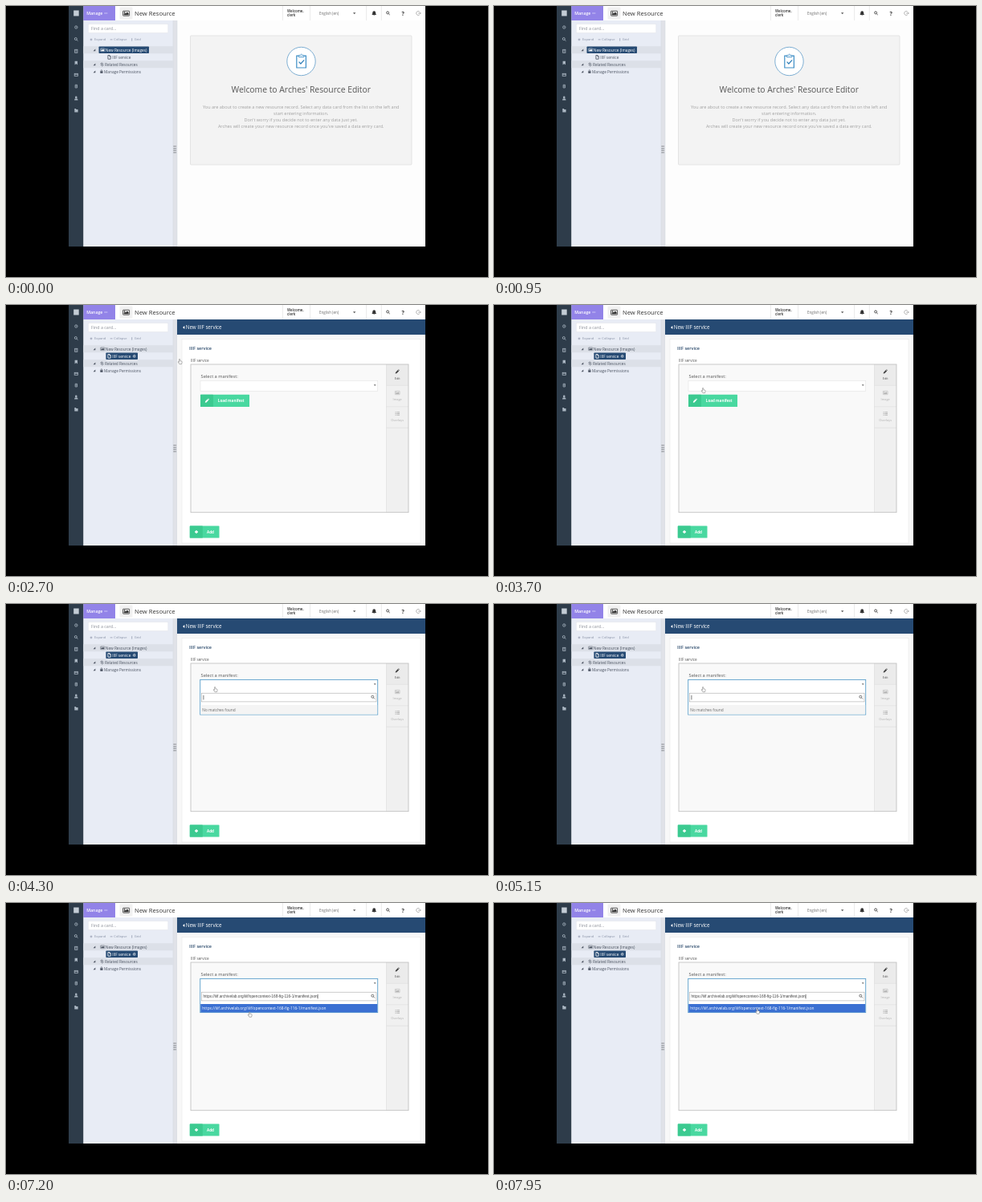
An HTML page for the animation above (8 s loop, 600x338 px).

```html
<!DOCTYPE html>
<html lang="en">
<head>
<meta charset="utf-8">
<title>Resource editor</title>
<style>
html, body { margin: 0; height: 100%; overflow: hidden; background: #000; }
svg { display: block; width: 100vw; height: 100vh; font-family: "Open Sans", sans-serif; }
text { white-space: pre; }
.line { fill: none; stroke: currentColor; stroke-width: .8; }
.solid { fill: currentColor; }
.tree { font-size: 4.78px; fill: #4a5260; }
.tools { font-size: 4.1px; fill: #8790a5; }
.body { font-size: 5.53px; fill: #a0a0a0; text-anchor: middle; }
.tab { font-size: 3.9px; text-anchor: middle; }
.button { font-size: 4.6px; font-weight: 700; fill: #fff; }
</style>
</head>
<body>
<svg viewBox="0 0 600 338">
<defs>
  <g id="search"><circle class="line" cx="-.5" cy="-.5" r="1.5"/><path class="line" d="M.6 .6L2.2 2.2"/></g>
  <g id="image"><rect class="line" x="-4" y="-3" width="8" height="6" rx=".5"/><path class="solid" d="M-3 2V.8L-1.5-.7-.6.2 1.3-1.7 3 0V2z"/><circle class="solid" cx="-2" cy="-1.3" r=".8"/></g>
  <g id="doc"><path class="line" d="M-1.6-2.3H.5L1.7-1V2.4H-1.6zM.4-2.3V-.9H1.7"/></g>
  <g id="pencil"><path class="solid" d="M-2.4 2.4L-2 .7.8-2.1 2.1-.8-.7 2zM1.2-2.5L1.7-2.9 2.9-1.7 2.5-1.2z"/></g>
  <g id="plus"><path class="line" d="M-2 0H2M0-2V2" style="stroke-width:1.3"/></g>
  <g id="expander"><path d="M1.3-1.4V1.3H-1.4z" fill="#4a5260"/></g>
  <g id="add"><circle r="2.1" class="solid"/><path d="M-1.1 0H1.1M0-1.1V1.1" stroke-width=".7"/></g>
</defs>

<!-- application frame -->
<rect x="78" width="444" height="300" fill="#fdfdfd"/>
<rect x="78" width="18.5" height="300" fill="#2e3c4a"/>
<rect x="84.2" y="5.5" width="6.5" height="7" fill="#c3ccd5"/>
<g color="#aab6c2">
  <g transform="translate(87.3 26.5)"><circle class="line" r="1.7"/><path class="line" d="M0 0V-1M0 0H.9" style="stroke-width:.5"/></g>
  <use href="#search" x="87.3" y="41.5"/>
  <g transform="translate(87.3 56.3)"><rect class="line" x="-1.6" y="-2" width="3.2" height="4"/><path class="line" d="M-1-.7H1M-1 .6H1" style="stroke-width:.5"/></g>
  <path class="solid" d="M85.6 68.8H89V73.4L87.3 71.9 85.6 73.4z"/>
  <g transform="translate(87.3 85.8)"><rect class="line" x="-2.1" y="-1.5" width="4.2" height="3"/><path class="line" d="M-1.8-.5H1.8"/></g>
  <path class="line" d="M86.2 98.3H88.5V102H86.2zM86.2 100H88"/>
  <circle class="solid" cx="87.3" cy="113.9" r="1.3"/><path class="solid" d="M85 117.6Q85 115.3 87.3 115.3T89.6 117.6z"/>
  <path class="solid" d="M85.3 128H87.2V129H89.6V132.4H85.3z"/>
</g>

<rect x="96.5" width="39.5" height="18" fill="#9283e8"/>
<text x="100.3" y="11" font-size="5.2" font-weight="600" fill="#fff">Manage</text>
<path d="M122.2 9H126.4" stroke="#d8d2fa" stroke-width=".8"/>
<rect x="136" width="386" height="18" fill="#fff"/>
<rect x="141.5" y="1.5" width="16" height="15" rx="1" fill="#f1f1f1"/>
<g color="#333"><use href="#image" x="149.6" y="9.2"/></g>
<text x="160" y="11.7" font-size="7.64" fill="#333">New Resource</text>
<path d="M344.5 0V18M378.5 0V18M448.5 0V18M467.3 0V18" fill="none" stroke="#e2e2e2" stroke-width=".7"/>
<g font-size="4.4" font-weight="600" fill="#333"><text x="350" y="8.2">Welcome,</text><text x="350" y="13">clerk</text></g>
<text x="390" y="10.7" font-size="4.5" fill="#666">English (en)</text>
<path d="M432 8.2H435.4L433.7 10.2z" fill="#555"/>
<g color="#333">
  <path class="solid" d="M455.3 11Q456.3 10.3 456.3 8.3 456.3 6.5 458.2 6.3 460.1 6.5 460.1 8.3 460.1 10.3 461.1 11zM457.4 11.3H459Q458.2 12.5 457.4 11.3z"/>
  <use href="#search" x="475.6" y="8.9"/>
  <text x="492.5" y="11.6" font-size="7" font-weight="700" fill="#333">?</text>
  <path d="M514.8 7.1A2.5 2.5 0 1 0 514.8 10.9M513 9H516.3M515.2 7.8L516.3 9 515.2 10.2" fill="none" stroke="#888" stroke-width=".6"/>
</g>

<!-- tree panel -->
<rect x="96.5" y="18" width="111.5" height="282" fill="#e8ecf5"/>
<rect x="208" y="18" width="5" height="282" fill="#e0e2e8"/>
<path d="M208 18V300M213 18V300" stroke="#d3d6dd" stroke-width=".5"/>
<path d="M209.2 174.3V184M211.1 174.3V184" stroke="#8a8d92" stroke-width="1.3" stroke-dasharray="1.5 1.1"/>
<rect x="102.3" y="22.5" width="99.5" height="11" fill="#fff" stroke="#e1e4ea" stroke-width=".5"/>
<text x="106" y="30" font-size="5.3" fill="#8b8f98">Find a card...</text>
<g class="tools"><text x="110" y="43.4">Expand</text><text x="134.3" y="43.4">Collapse</text><text x="159.7" y="43.4">Grid</text></g>
<path d="M104.6 41.9H107.4M106 40.5V43.3M129.7 41.9H132.6M156.7 40.2V43.6" stroke="#8790a5" stroke-width=".7"/>
<path d="M96.5 54.8H208M96.5 72.8H208" stroke="#dce0e8" stroke-width="9"/>
<use href="#expander" x="110" y="55"/><use href="#expander" x="110" y="73"/><use href="#expander" x="110" y="82"/>
<rect id="rootBox" x="115.5" y="50.5" width="62.5" height="8.6" rx=".8" fill="#264a73"/>
<rect id="leafBox" x="124.4" y="59.4" width="39.6" height="8.7" rx=".8" fill="#264a73"/>
<g class="tree">
  <g id="rootRow"><use href="#image" transform="translate(120.2 54.8) scale(.62)"/><text x="123.8" y="56.5">New Resource (Images)</text></g>
  <g id="leafRow"><use href="#doc" x="128.5" y="63.8"/><text x="132.2" y="65.6">IIIF service</text><use id="leafAdd" href="#add" x="159.8" y="63.9"/></g>
  <path d="M118 74.2L121 71.5M117.7 72.2L119.4 70.8M119.6 75L121.4 73.4" stroke="#4a5260" fill="none"/>
  <text x="123" y="74.5">Related Resources</text>
  <rect x="117.3" y="81.3" width="3.2" height="2.5"/><path d="M118 81.5V80.3Q118.9 79 119.8 80.3V81.5" fill="none" stroke="#4a5260" stroke-width=".6"/>
  <text x="122" y="83.5">Manage Permissions</text>
</g>

<!-- welcome page -->
<g id="welcome">
  <rect x="229.5" y="37" width="275.5" height="161" rx="1" fill="#f3f3f3" stroke="#dcdcdc" stroke-width=".7"/>
  <circle cx="367.5" cy="69" r="17.7" fill="#fff" stroke="#5f9bc8" stroke-width=".8"/>
  <g fill="none" stroke="#3f8fc6" stroke-width="1.2"><path d="M364.3 62.2H361.8V77H373.4V62.2H370.8"/><path d="M364.4 63.8V61.4H366.2Q367.6 58.8 369 61.4H370.8V63.8z" fill="#dcecf7" stroke-width=".8"/><path d="M364.6 69.6L366.9 72 371.2 67.3" stroke="#2f7fb8"/></g>
  <text x="367.3" y="107.7" font-size="10.36" text-anchor="middle" fill="#555">Welcome to Arches' Resource Editor</text>
  <g class="body">
    <text x="367.2" y="128">You are about to create a new resource record. Select any data card from the list on the left and</text>
    <text x="367.2" y="136">start entering information.</text>
    <text x="367.2" y="144">Don't worry if you decide not to enter any data just yet.</text>
    <text x="367.2" y="152">Arches will create your new resource record once you've saved a data entry card.</text>
  </g>
</g>

<!-- card editor -->
<g id="editor">
  <rect x="213" y="18" width="309" height="282" fill="#f8f8f8"/>
  <rect x="213" y="18" width="309" height="19" fill="#264a73"/>
  <path d="M222.3 26V30L220 28z" fill="#fff"/>
  <text x="223.8" y="30.2" font-size="6.24" fill="#fff">New IIIF service</text>
  <rect x="219" y="42.5" width="297" height="254.5" fill="#fff" stroke="#e8e8e8" stroke-width=".6"/>
  <text x="228" y="55.6" font-size="5.5" font-weight="600" fill="#2b4a6b">IIIF service</text>
  <text x="230" y="71.3" font-size="4.65" fill="#555">IIIF service</text>
  <rect x="230" y="74" width="271" height="184.7" fill="#f9f9f9"/>
  <rect x="473.5" y="74" width="27.5" height="184.7" fill="#f0f0f0"/>
  <rect x="473.5" y="74" width="27.5" height="26.3" fill="#ebebeb"/>
  <path d="M473.5 74V258.7M473.5 100.3H501M473.5 126.8H501M473.5 153.2H501" fill="none" stroke="#dadada" stroke-width=".6"/>
  <rect x="230" y="74" width="271" height="184.7" fill="none" stroke="#bcbcbc" stroke-width=".8"/>
  <g color="#444"><use href="#pencil" x="487" y="83.2"/><text class="tab" x="487.2" y="92.6" fill="#555">Edit</text></g>
  <g color="#b5b5b5" fill="#b0b0b0">
    <use href="#image" transform="translate(487.2 109.5) scale(.72)"/><text class="tab" x="487.2" y="118.9">Image</text>
    <path d="M484.5 133.8H485.7M486.4 133.8H490M484.5 135.5H485.7M486.4 135.5H490M484.5 137.2H485.7M486.4 137.2H490" stroke="#b5b5b5" stroke-width="1.1"/><text class="tab" x="487.2" y="145.2">Overlays</text>
  </g>
  <text x="242.6" y="91" font-size="5.65" fill="#555">Select a manifest:</text>
  <rect x="242" y="94.3" width="220.7" height="13" fill="#fff" stroke="#e4e4e4" stroke-width=".6"/>
  <path d="M457.8 99.2H460.6L459.2 101z" fill="#666"/>
  <rect x="242" y="111.8" width="61" height="15.2" rx=".6" fill="#49d8a0"/>
  <rect x="242" y="111.8" width="16" height="15.2" rx=".6" fill="#3bca90"/>
  <g color="#fff"><use href="#pencil" x="250.2" y="119.4"/></g>
  <text class="button" x="263.8" y="121">Load manifest</text>
  <rect x="228.8" y="275.5" width="36.7" height="15" rx=".6" fill="#49d8a0"/>
  <rect x="228.8" y="275.5" width="16" height="15" rx=".6" fill="#3bca90"/>
  <g color="#fff"><use href="#plus" x="237" y="283"/></g>
  <text class="button" x="250" y="284.7">Add</text>

  <g id="dropdown">
    <rect id="menu" x="241.7" y="94.4" width="221" height="43.6" fill="#fff" stroke="#5b9fcb" stroke-width=".9"/>
    <path d="M457.8 99.2H460.6L459.2 101z" fill="#666"/>
    <rect x="243.5" y="111.2" width="217.5" height="10.7" fill="#fff" stroke="#aaa" stroke-width=".6"/>
    <g color="#555"><use href="#search" x="456.8" y="116.2"/></g>
    <text id="query" x="245.6" y="118.3" font-size="4.78" font-family="'Liberation Sans', Arial, sans-serif" fill="#444"></text>
    <path id="caret" d="M0 113.8V119.4" stroke="#222" stroke-width=".6"/>
    <rect id="resultBar" x="242.2" width="220" y="126"/>
    <text id="result" x="244.3" font-size="4.8"></text>
  </g>
</g>

<path id="pointer" d="M-.9-2.9Q-.3-3.5.1-2.8L.4-.8 2.3-.2Q2.8.1 2.6 1L2 3.2H-.6L-2.3.6Q-2.3-.1-1.6.1L-.8.8z" fill="#fff" stroke="#666" stroke-width=".5"/>
</svg>

<script>
const LOOP = 8000, HOVER = 1500, PAGE = 2350, OPEN = 4000, PASTE = 6300;
const URL_TEXT = "https://iiif.archivelab.org/iiif/opencontext-168-fig-116-1/manifest.json";
const $ = id => document.getElementById(id);
const show = (id, on) => $(id).style.display = on ? "" : "none";
const setText = (id, value) => { if ($(id).textContent !== value) $(id).textContent = value; };

// Pointer stops: time, x, y
const route = [
  [1100, 190, 100], [1700, 143.5, 65], [2350, 143.5, 65], [2700, 216.5, 70.5],
  [3300, 260.5, 106.5], [6500, 260.5, 106.5], [7050, 303.5, 139], [7350, 303.5, 139], [7850, 328, 135]
];

function pointerAt(t) {
  const next = route.findIndex(stop => stop[0] > t);
  if (next < 0) return route.at(-1).slice(1);
  if (next === 0) return route[0].slice(1);
  const [t0, x0, y0] = route[next - 1], [t1, x1, y1] = route[next];
  const u = (t - t0) / (t1 - t0), k = u * u * (3 - 2 * u);
  return [x0 + (x1 - x0) * k, y0 + (y1 - y0) * k];
}

function paintRow(id, selected) {
  const color = selected ? "#fff" : "#4a5260";
  $(id).style.fill = $(id).style.color = color;
}

function render(t) {
  const editing = t >= PAGE, pasted = t >= PASTE;
  show("welcome", !editing);
  show("editor", editing);
  show("rootBox", !editing);
  show("leafBox", editing);
  paintRow("rootRow", !editing);
  paintRow("leafRow", editing);
  show("leafAdd", t >= HOVER);
  $("leafAdd").style.stroke = editing ? "#264a73" : "#e8ecf5";

  show("dropdown", t >= OPEN);
  $("menu").setAttribute("height", pasted ? 42.2 : 43.6);
  setText("query", pasted ? URL_TEXT : "");
  setText("result", pasted ? URL_TEXT : "No matches found");
  $("result").setAttribute("y", pasted ? 132.7 : 133.7);
  $("result").setAttribute("fill", pasted ? "#fff" : "#666");
  $("resultBar").setAttribute("height", pasted ? 10.4 : 11.6);
  $("resultBar").setAttribute("fill", pasted ? "#3b70d2" : "#f4f4f4");
  const caretX = 245.9 + (pasted ? $("query").getComputedTextLength() : 0);
  $("caret").setAttribute("transform", `translate(${caretX})`);
  show("caret", (t + 150) % 1000 < 500);

  show("pointer", t >= route[0][0]);
  $("pointer").setAttribute("transform", `translate(${pointerAt(t)})`);
}

const start = performance.now();
function frame() {
  render((performance.now() - start) % LOOP);
  requestAnimationFrame(frame);
}
frame();
</script>
</body>
</html>
```
